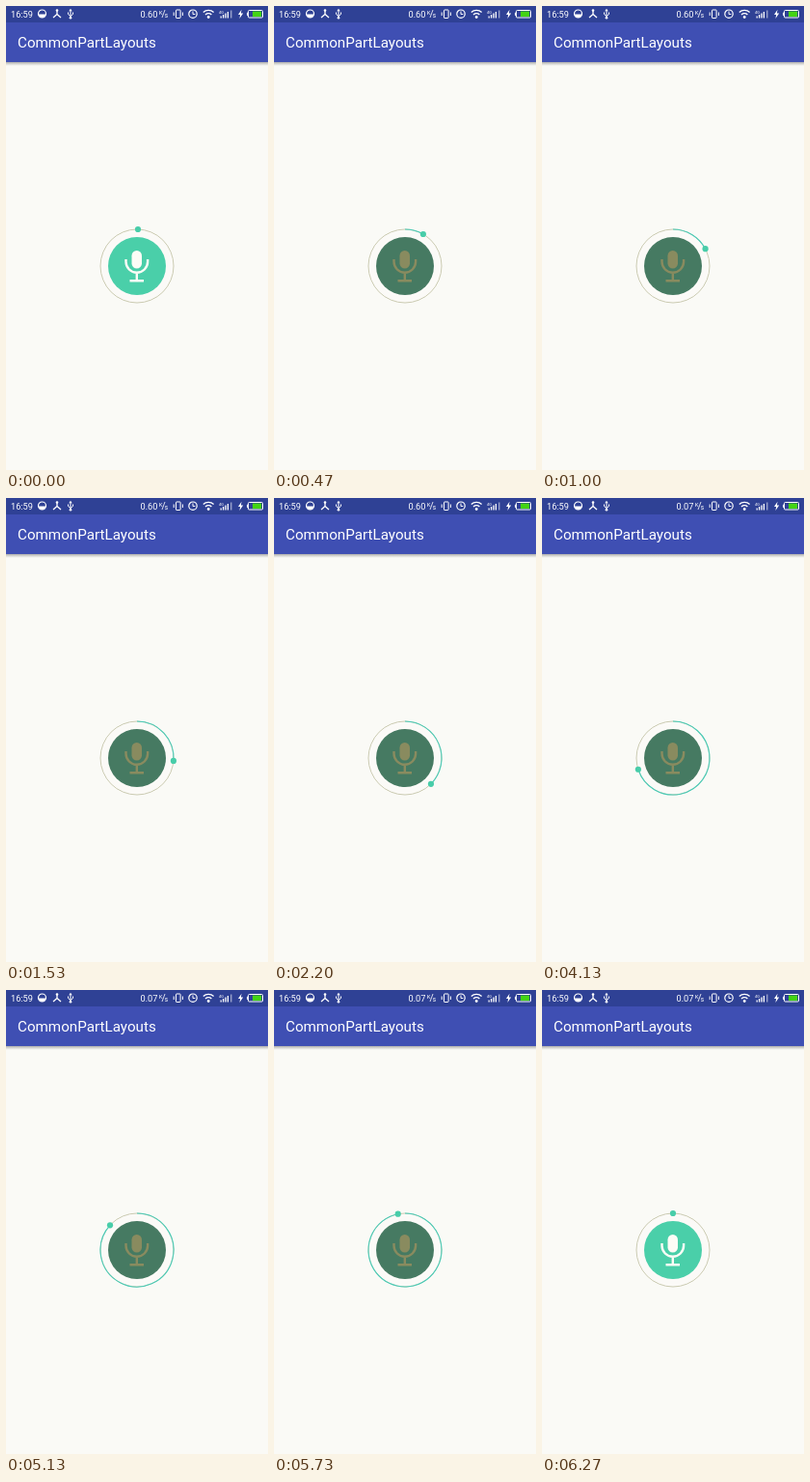
An HTML page for the animation above (6590 ms loop, 272 by 480 pixels).

```html
<!DOCTYPE html>
<html lang="en">
<head>
<meta charset="utf-8">
<style>
html, body { margin: 0; width: 100%; height: 100%; overflow: hidden; background: #fafaf6; }
svg { display: block; width: 272px; height: 480px; font-family: Roboto, sans-serif; }
.line { fill: none; stroke: #fff; }
</style>
</head>
<body>
<svg viewBox="0 0 272 480">
  <defs>
    <linearGradient id="shade" x2="0" y2="1">
      <stop stop-color="#777" stop-opacity=".6"/>
      <stop offset="1" stop-color="#999" stop-opacity="0"/>
    </linearGradient>
  </defs>
  <rect width="272" height="480" fill="#fafaf6"/>
  <rect y="58" width="272" height="4" fill="url(#shade)"/>
  <rect width="272" height="58" fill="#3f4fb3"/>
  <rect width="272" height="17" fill="#2f4195"/>
  <text x="12" y="43" font-size="15.2" fill="#fff">CommonPartLayouts</text>

  <!-- status bar -->
  <g fill="#fff" font-size="9.2">
    <text x="5" y="11.5">16:59</text>
    <text id="speed" x="139.5" y="11.5"></text>
    <text x="158.7" y="8.5" font-size="6">K</text>
    <text x="164.8" y="12" font-size="6.5">s</text>
    <path class="line" stroke-width=".8" d="M162 12l3-8"/>
    <circle class="line" cx="37.5" cy="8" r="4" stroke-width="1.2"/>
    <path d="M34 8.5h7a3.5 3.5 0 0 1-7 0z"/>
    <path class="line" stroke-width="1.3" d="M53 4v4.5l-4 3.5M53 8.5l4 3.5"/>
    <circle cx="53" cy="4.5" r="1.3"/>
    <path class="line" d="M67 4v9M64.5 6.5v2l2.5 2 2.5-2v-2"/>
    <path d="M65.3 5.2 67 2.8l1.7 2.4z"/><circle cx="67" cy="12.3" r="1.3"/>
    <rect class="line" x="176.5" y="4" width="4.6" height="8.5" rx=".6"/>
    <path class="line" d="M174.2 6.5v3.5M183.4 6.5v3.5"/>
    <circle class="line" cx="194" cy="8.2" r="4.2" stroke-width="1.2"/>
    <path class="line" d="M194 5.5v3h2.3"/>
    <path class="line" stroke-width="1.3" d="M204.8 6.5a7.8 7.8 0 0 1 10.8 0M207 9a4.7 4.7 0 0 1 6.4 0"/>
    <circle cx="210.2" cy="11.5" r="1.4"/>
    <path class="line" stroke-width="1.3" d="M223.2 12.5v-2M225.6 12.5V9M228 12.5V7.5M230.4 12.5V6"/>
    <path class="line" stroke-width="1.1" d="M233.8 12.5v-8" opacity=".65"/>
    <text x="221" y="7.5" font-size="4">4G</text>
    <path d="M244.5 3.8 241 9h2.2l-.8 4 3.8-5.6h-2.3z"/>
    <rect class="line" x="251.5" y="4.5" width="15" height="7.5" rx="1"/>
    <rect x="250" y="6.8" width="1.5" height="3"/>
    <rect x="256" y="5.5" width="9.2" height="5.6" fill="#43d414"/>
  </g>

  <!-- record button -->
  <circle cx="136" cy="269" r="38" fill="#fbfaf7" stroke="#cbcbb2"/>
  <path id="arc" fill="none" stroke="#4accb8" stroke-width="1.1"/>
  <circle id="disc" cx="136" cy="269" r="30"/>
  <g id="mic" fill="none" stroke-width="2.4">
    <rect x="130.5" y="253" width="10.5" height="18.5" rx="5.2" stroke="none" fill="currentColor"/>
    <path stroke="currentColor" d="M124.5 262v2.5a11.3 11.3 0 0 0 22.6 0V262M135.8 275.8v8M128.5 284.3h14.5"/>
  </g>
  <circle id="dot" r="3.1" fill="#48cda9"/>
</svg>
<script>
const $ = id => document.getElementById(id);
const LOOP = 6590, STEP = 200 / 3, LAST = 6270, R = 38;
const START = 1.5, SPEED = .0606; // degrees, degrees per ms
const set = (id, attrs) => {
  for (const key in attrs) $(id).setAttribute(key, attrs[key]);
};

function draw(now) {
  // Steps fall on times rounded to 10 ms, so allow half of that.
  const t = Math.floor((Math.min(now % LOOP, LAST) + 5) / STEP) * STEP;
  const sweep = START + SPEED * t;
  const running = sweep < 360;
  const pressed = running && t > 0;
  const a = running ? sweep * Math.PI / 180 : 0;
  const x = 136 + R * Math.sin(a), y = 269 - R * Math.cos(a);
  set('dot', { cx: x, cy: y });
  set('arc', { d: pressed ? `M136 231A${R} ${R} 0 ${+(sweep > 180)} 1 ${x} ${y}` : '' });
  set('disc', { fill: pressed ? '#467a62' : '#4acfa9' });
  set('mic', { color: pressed ? '#898b5f' : '#fcfcf6' });
  $('speed').textContent = t < 2700 ? '0.60' : '0.07';
}

const start = performance.now();
(function tick() {
  draw(performance.now() - start);
  requestAnimationFrame(tick);
})();
</script>
</body>
</html>
```
